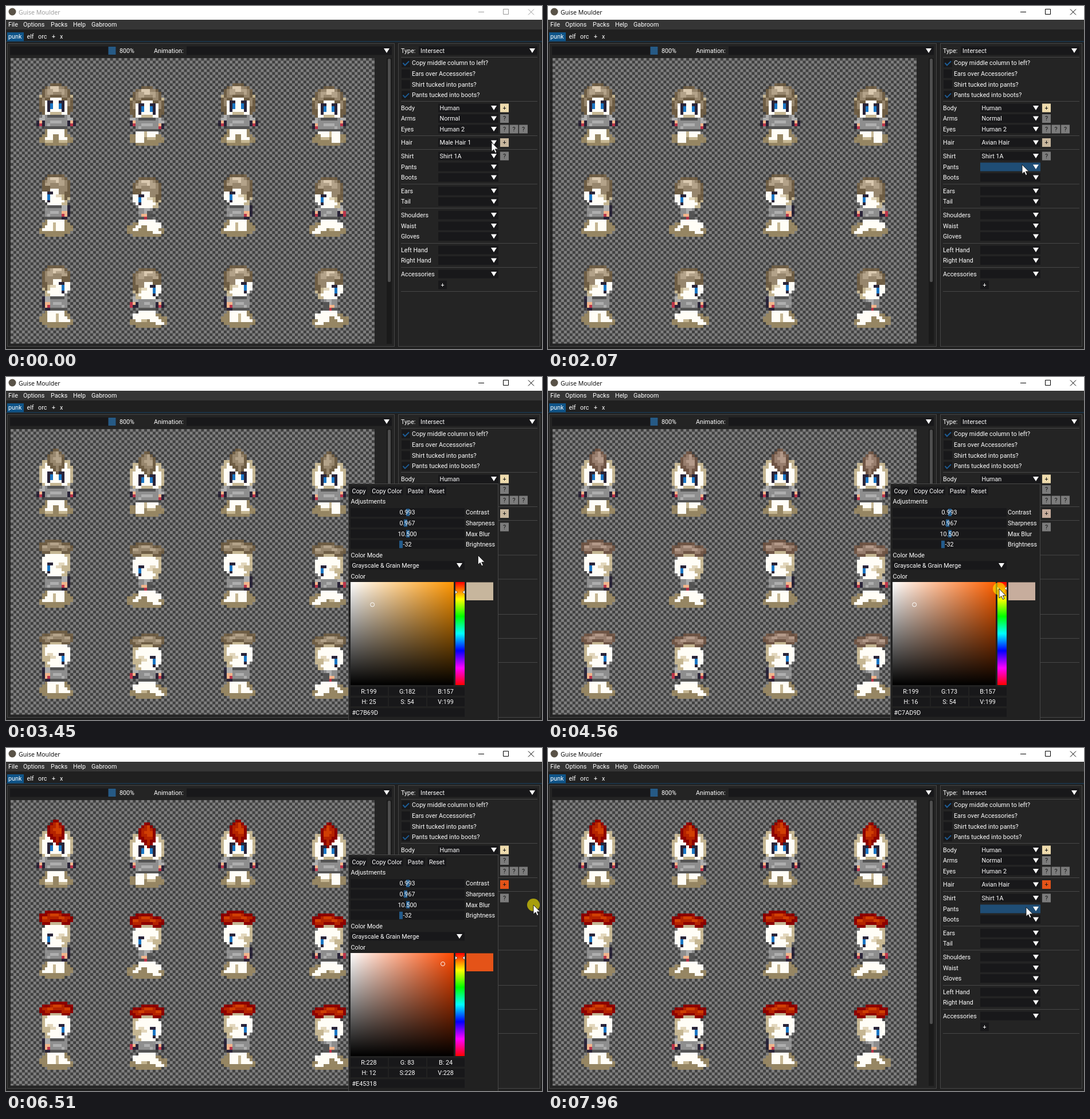
Recreate the animation shown at these times as an HTML page. Size 935x599 px, loop 8 s.

```html
<!DOCTYPE html>
<html lang="en">
<head>
<meta charset="utf-8">
<title>Guise Moulder</title>
<style>
html,body{margin:0;width:100%;height:100%;overflow:hidden;background:#202020}
svg{display:block;width:100vw;height:100vh}
text{font:10.75px Roboto,sans-serif;fill:#fff;white-space:pre}
.title{font:10.6px "Open Sans",sans-serif}
.mid{text-anchor:middle}
.px{shape-rendering:crispEdges}
.h0{fill:var(--h0)}.h1{fill:var(--h1)}.h2{fill:var(--h2)}.h3{fill:var(--h3)}
</style>
</head>
<body>
<svg id="stage" viewBox="0 0 935 599" xmlns="http://www.w3.org/2000/svg"></svg>
<script>
const LOOP = 8000, PX = 4.96;
const FRAME = '#18181a', BLUE = '#1f4d75', LINE = '#474747', THUMB = '#4f4f4f';
const TAN = '#968663', SAND = '#c5b692', WHITE = '#fffdf6', NAVY = '#2a2438',
  SKIN = '#f3b58c', RED = '#b9344a', G0 = '#545454', G1 = '#8e8e8e', G2 = '#aeaeae', EYE = '#1b76c4';

const rect = (x, y, w, h, fill, more = '') => `<rect x="${x}" y="${y}" width="${w}" height="${h}" fill="${fill}" ${more}/>`;
const text = (x, y, s, more = '') => `<text x="${x}" y="${y + 3.8}" ${more}>${s}</text>`;
const path = (d, fill) => `<path d="${d}" fill="${fill}"/>`;
const tone = (n, d) => `<path class="h${n}" d="${d}"/>`;
const group = (id, s, more = '') => `<g id="${id}" ${more}>${s}</g>`;
const arrow = (x, y) => path(`M${x - 5} ${y - 4}h10l-5 8z`, '#fff');
const flip = s => `<g transform="translate(32 0) scale(-1 1)">${s}</g>`;
const both = s => s + flip(s);

// ---- characters, drawn on a 32 unit cell ----
const heads = group('front',
  path('M13 10h6v1h2v2h1v6h-1v1h-10v-1h-1v-6h1v-2h2z', SAND) +
  path('M13 11h6v1h1v2h1v5h-1v1h-8v-1h-1v-5h1v-2h1z', WHITE) +
  `<g class="old">` +
  tone(0, 'M14 9h4v1h2v1h1v3h1v5h-1v1h-1v-5h-2v-1h-4v1h-2v5h-1v-1h-1v-5h1v-3h1v-1h2z') +
  tone(1, 'M13 10h6v1h1v3h1v3h-1v-3h-2v-1h-4v1h-2v3h-1v-3h1v-3h1z') +
  tone(2, 'M13 11h6v2h-1v-1h-3v1h-2z') + tone(3, 'M14 10h3v2h-2v-1h-1z') + `</g><g class="new">` +
  tone(0, 'M15 7h2v1h1v1h1v5h-1v1h-1v1h-1v-1h-1v-1h-1v-1h-1v-4h1v-1h1z') +
  tone(1, 'M15 8h2v1h1v4h-1v2h-1v-2h-1v-1h-1v-3h1z') +
  tone(2, 'M16 8h1v2h1v2h-2v-1h-1v-1h1z') + `</g>` +
  both(path('M13 15h2v1h-1v2h-1zM13 18h1v1h-1z', NAVY) + path('M14 16h1v2h-1z', EYE)) +
  path('M14 19h4v1h-4z', SAND)) +
group('side',
  path('M12 11h8v1h1v6h-1v2h-7v-1h-1v-1h-1v-5h1z', SAND) +
  path('M12 12h7v1h1v3h-2v2h1v1h-1v1h-5v-1h-1v-1h-1v-5h1z', WHITE) +
  path('M17 15h2v1h-1v1h-2v-1h1z', '#e2d6bb') + `<g class="old">` +
  tone(0, 'M13 9h6v1h1v1h1v6h-1v1h-1v-2h-2v-2h-3v1h-3v-4h1v-1h1z') +
  tone(1, 'M13 10h6v1h1v4h-1v1h-2v-2h-3v-1h-2v-2h1z') +
  tone(2, 'M13 10h5v1h1v2h-2v-1h-3v1h-2v-1h1z') + tone(3, 'M14 10h3v2h-1v-1h-2z') + `</g><g class="new">` +
  tone(0, 'M13 7h5v1h3v1h1v2h-1v1h-3v-1h-4v1h-3v-1h-1v-3h2v-1h1z') +
  tone(1, 'M13 8h5v1h3v1h-1v1h-2v-1h-4v1h-3v-2h2z') +
  tone(2, 'M14 8h3v1h2v1h-2v-1h-3zM11 9h2v1h-2z') + `</g>` +
  path('M13 15h2v1h-1v3h-1z', NAVY) + path('M13 16h1v2h-1z', EYE));

const shirt = (x, y, w) => rect(x, y, w, 5, G1) + rect(x + 1, y, w - 2, 1, G0) +
  rect(x + 2, y + 2, w - 4, 1, G2) + rect(x + 1, y + 3, 1, 1, G2) + rect(x, y + 4, w, 1, G0);
const hand = (x, y) => rect(x - 1, y, 3, 2, NAVY) + rect(x, y, 1, 1, SKIN) + rect(x, y + 1, 1, 1, RED);
const sleeve = (x, y) => path(`M${x} ${y}h2v3h-3v-2h1z`, G2);
const useHead = (id, dy) => `<use href="#${id}" y="${dy}"/>`;

const poses = group('idle',
  path('M12 25h8v2h1v1h1v2h-2v1h-8v-1h-2v-2h1v-1h1z', TAN) +
  both(path('M13 25h3v2h-1v2h-3v-1h1z', WHITE) + path('M12 29h3v1h-3z', SAND) +
    sleeve(11, 20) + hand(10, 22)) + shirt(12, 20, 8) + useHead('front', 0)) +
group('step',
  path('M12 25h8v2h1v1h1v2h-2v1h-8v-1h-2v-3h2z', TAN) +
  path('M12 26h3v4h-3zM16 25h4v2h-1v1h-3z', WHITE) + path('M15 26h1v2h-1zM16 28h3v1h-3z', SAND) +
  sleeve(11, 20) + hand(11, 22) + flip(sleeve(11, 21)) + hand(20, 23) +
  shirt(12, 21, 8) + useHead('front', 1)) +
group('sideIdle',
  path('M12 25h8v1h1v1h1v2h-1v1h-2v1h-7v-1h-2v-2h1v-2h1z', TAN) +
  path('M13 24h6v5h-3v-2h-1v2h-4v-1h1v-1h1z', WHITE) + path('M15 26h1v3h-1z', SAND) +
  shirt(12, 20, 7) + path('M18 19h2v4h-2z', G2) + path('M20 20h1v4h-1zM18 24h2v1h-2z', NAVY) +
  path('M18 22h2v1h-2zM19 23h1v1h-1z', SKIN) + path('M18 23h1v1h-1z', RED) + useHead('side', 0)) +
group('stride',
  path('M12 26h8v1h1v1h1v2h-1v1h-10v-1h-2v-3h2v-1z', TAN) +
  path('M13 25h6v1h2v2h-1v1h-1v-1h-3v-1h-2v1h-1v1h-2v-1h1v-1h1z', WHITE) +
  path('M16 28h3v1h2v1h-3v-1h-2z', WHITE) +
  shirt(13, 20, 5) + path('M15 20h2v3h-2z', G2) + path('M16 22h2v2h-1v1h-1z', G0) +
  path('M14 23h2v1h-2z', SKIN) + path('M15 24h1v1h-1z', RED) + useHead('side', 1)) +
group('swing',
  path('M12 26h8v1h1v1h1v2h-2v1h-9v-1h-2v-3h2v-1z', TAN) +
  path('M13 25h6v1h2v2h-1v1h-2v-1h-3v1h-2v1h-3v-1h1v-1h1v-1h1z', WHITE) +
  path('M16 28h2v1h-2z', SAND) +
  path('M11 21h3v2h-3zM18 20h3v2h-3z', G2) + shirt(13, 20, 6) +
  path('M10 22h3v2h-3zM19 22h3v2h-3z', NAVY) + path('M11 22h1v1h-1zM20 22h1v1h-1z', SKIN) +
  path('M11 23h1v1h-1zM21 22h1v2h-1z', RED) + useHead('side', 1));

const use = id => `<use href="#${id}"/>`;
const sheet = [
  [use('idle'), use('step'), use('idle'), flip(use('step'))],
  [use('sideIdle'), use('stride'), use('sideIdle'), use('swing')],
  [use('sideIdle'), use('swing'), use('sideIdle'), use('stride')].map(flip)
].map((row, j) => row.map((s, i) => `<g transform="translate(${i * 32} ${j * 32})">${s}</g>`).join('')).join('');

// ---- window ----
const combos = [['Body', 178, 'Human'], ['Arms', 196.5, 'Normal'], ['Eyes', 215, 'Human 2'], ['Hair', 238.5, ''],
  ['Shirt', 262, 'Shirt 1A'], ['Pants', 281, ''], ['Boots', 299.5, ''], ['Ears', 323, ''], ['Tail', 341.5, ''],
  ['Shoulders', 365, ''], ['Waist', 384, ''], ['Gloves', 402.5, ''], ['Left Hand', 426, ''],
  ['Right Hand', 444.5, ''], ['Accessories', 468, '']];
const checks = [['Copy middle column to left?', 1], ['Ears over Accessories?', 0],
  ['Shirt tucked into pants?', 0], ['Pants tucked into boots?', 1]];
const box = (x, y, w, more) => rect(x, y - 7.5, w, 15, FRAME, more);
const tile = (x, y, s, fill, more) => rect(x, y - 7.5, 15, 15, fill, more) +
  text(x + 7.5, y, s, 'class="mid" style="fill:#151515"');
const panel = (x, y, w, h) => rect(x, y, w, h, '#242424', `stroke="${LINE}"`);

const chrome = rect(0, 0, 935, 24, '#fff') + `<circle cx="11" cy="10" r="6.5" fill="#595247"/>` +
  group('caption', `<text class="title" x="22" y="15" style="fill:currentColor">Guise Moulder</text>
    <path d="M824 10.5h10M867.5 5.5h9v9h-9zM911 5.5l10 10M921 5.5l-10 10" fill="none" stroke="currentColor"/>`) +
  rect(0, 24, 935, 17, '#353535') +
  [[4, 'File'], [30, 'Options'], [78, 'Packs'], [117, 'Help'], [149, 'Gabroom']].map(m => text(m[0], 32.5, m[1])).join('') +
  rect(2, 46, 29, 15.5, '#0f5488') + rect(0, 61.5, 935, 1, '#16456b') +
  [[4, 'punk'], [36.5, 'elf'], [56, 'orc'], [80, '+'], [94, 'x']].map(m => text(m[0], 53.5, m[1])).join('');

const left = panel(2.5, 65.5, 675, 529) + box(7, 78, 185) + rect(178.5, 71, 13, 14, '#265a85') + text(198, 78, '800%') +
  text(258, 78, 'Animation:') + box(315, 78, 358) + arrow(664, 78) +
  rect(664, 91, 9, 499, '#1a1a1a') + rect(666, 92, 5, 390, THUMB, 'rx="2"') +
  `<g clip-path="url(#view)"><g class="px" transform="translate(8 90.5) scale(${PX})">
    <rect width="128" height="101" fill="url(#checker)"/>${sheet}</g></g>`;

const right = panel(684.5, 65.5, 247, 529) + text(689, 78, 'Type:') + box(720, 78, 207) + text(723, 78, 'Intersect') + arrow(918, 78) +
  checks.map(([s, on], i) => {
    const y = 99.5 + i * 18.7;
    return box(690, y, 15) + text(708, y, s) +
      (on ? `<path d="M692.5 ${y}l3.5 4 7-7" fill="none" stroke="#1d5c94" stroke-width="2"/>` : '');
  }).join('') +
  [89.5, 166.5, 226.5, 250.5, 311, 353, 414.5, 456.5, 498.5].map(y => rect(689, y - .5, 238, 1, LINE)).join('') +
  combos.map(([s, y, v], i) => text(689, y, s) + box(754, y, 105, `id="combo${i}"`) +
    (s === 'Hair' ? rect(843, y - 7.5, 16, 15, '#1d588c', 'id="open"') : '') +
    text(756.5, y, v, `id="value${i}"`) + arrow(851, y)).join('') +
  tile(862, 178, '+', '#efdcae') + tile(862, 238.5, '+', '#000', 'id="tint"') +
  [[862, 196.5], [862, 215], [878.5, 215], [895, 215], [862, 262]].map(p => tile(...p, '?', '#7c7c7c')).join('') +
  box(754, 487, 15) + text(761.5, 487, '+', 'class="mid"');

// ---- hair list ----
const ROW = 14.9, TOP = 248;
const series = (s, n) => Array.from({ length: n }, (_, i) => `${s} Hair ${i + 1}`);
const hairs = ['', 'Avian Hair', ...series('Female', 7), ...series('Male', 8)];
const list = group('list', rect(754.5, 247.5, 104, 125.5, '#171717', `stroke="${LINE}"`) +
  `<g clip-path="url(#listView)">` + group('items', rect(755, 9 * ROW, 94, ROW, '#242428') +
    rect(755, 0, 94, ROW, BLUE, 'id="hot"') + hairs.map((s, i) => text(756.5, (i + .5) * ROW, s)).join('')) + `</g>` +
  rect(852, 0, 5.5, 60, THUMB, 'id="thumb" rx="2"'));

// ---- colour popup ----
const sliders = [['Contrast', '0.993', 698], ['Sharpness', '0.967', 694], ['Max Blur', '10.500', 698], ['Brightness', '-32', 686]];
const fields = [0, 1, 2, 3, 4, 5].map(i => {
  const x = 601 + i % 3 * 67, y = i < 3 ? 549 : 567.5;
  return box(x, y, 65) + text(x + 32, y, '', `class="mid" id="num${i}"`);
}).join('');
const popup = group('popup', rect(597.5, 186.5, 261, 415, '#212121', `stroke="${LINE}"`) +
  [[601, 29, 'Copy'], [636, 57, 'Copy Color'], [698, 33, 'Paste'], [735, 33, 'Reset']]
    .map(([x, w, s]) => box(x, 199, w) + text(x + w / 2, 199, s, 'class="mid"')).join('') +
  text(601.5, 217.5, 'Adjustments') +
  sliders.map(([s, v, x], i) => {
    const y = 236.5 + i * 18.6;
    return box(601, y, 199) + rect(x, y - 6.5, 6, 13, '#235b8b') + text(700, y, v, 'class="mid"') + text(802, y, s);
  }).join('') +
  text(601.5, 311, 'Color Mode') + box(601, 329, 199) + text(603.5, 329, 'Grayscale &amp; Grain Merge') + arrow(791, 329) +
  text(601.5, 348, 'Color') + rect(601, 358, 180, 180, '#f00', 'id="pure"') +
  rect(601, 358, 180, 180, 'url(#toWhite)') + rect(601, 358, 180, 180, 'url(#toBlack)') +
  `<circle id="pick" r="3.5" fill="none" stroke="#fff"/>` + rect(784, 358, 16, 180, 'url(#hues)') +
  group('huePos', path('M783.5-3.5l4 3.5-4 3.5zM800.5-3.5l-4 3.5 4 3.5z', '#fff'), 'stroke="#111" stroke-width=".6"') +
  rect(803, 358.5, 47, 31.5, '#000', 'id="swatch"') + fields + box(601, 586, 199) + text(603.5, 586, '', 'id="hex"'));

const stops = (list) => list.map((c, i) => `<stop offset="${i / (list.length - 1)}" stop-color="${c}"/>`).join('');
const stage = document.getElementById('stage');
stage.innerHTML = `<defs>
  <clipPath id="view"><rect x="8" y="90.5" width="635" height="499"/></clipPath>
  <clipPath id="listView"><rect x="755" y="248" width="103" height="124.5"/></clipPath>
  <pattern id="checker" width="2" height="2" patternUnits="userSpaceOnUse">
    <rect width="2" height="2" fill="#7f7f7f"/><path d="M1 0h1v1h-1zM0 1h1v1h-1z" fill="#404040"/></pattern>
  <linearGradient id="toWhite"><stop stop-color="#fff"/><stop offset="1" stop-color="#fff" stop-opacity="0"/></linearGradient>
  <linearGradient id="toBlack" x2="0" y2="1"><stop stop-opacity="0"/><stop offset="1"/></linearGradient>
  <linearGradient id="hues" x2="0" y2="1">${stops(['#f00', '#ff0', '#0f0', '#0ff', '#00f', '#f0f', '#f00'])}</linearGradient>
  ${heads}${poses}</defs>` +
  rect(0, 0, 935, 599, '#202020') + chrome + left + right + list + popup +
  `<circle id="press" r="11" fill="#fff000" fill-opacity=".6"/>
  <path id="cursor" d="M0 0v16.3l3.8-3.5 2.6 5.7 2.6-1.1-2.6-5.5h5.2z" fill="#fff" stroke="#111" stroke-width=".9"/>`;

// ---- motion ----
const $ = id => document.getElementById(id);
const set = (id, o) => { for (const k in o) $(id).setAttribute(k, o[k]); };
const show = (el, on) => el.style.display = on ? '' : 'none';
const route = [[970, 847, 238], [1070, 829, 275], [1450, 829, 275], [1490, 827, 277], [2230, 827, 277], [2550, 869, 238],
  [3150, 869, 238], [3710, 787, 370], [3740, 786.5, 367.5], [3940, 786.5, 367.5], [4000, 787, 369.8], [4560, 787, 369.8],
  [4810, 787, 367.1], [4960, 787, 367.1], [5110, 745, 383], [5350, 762, 377], [5960, 762, 377], [6260, 920, 274],
  [6680, 920, 274], [7300, 849, 268], [7430, 849, 268], [7600, 841, 268], [7800, 841, 268], [7960, 834, 278]];
const presses = [[170, 290], [1950, 2040], [2910, 2990], [3940, 4810], [5110, 5960], [6510, 6600]];

function cursorAt(t) {
  const i = route.findIndex(k => k[0] > t);
  if (i < 0) return route[route.length - 1].slice(1);
  if (!i) return route[0].slice(1);
  const [a, ax, ay] = route[i - 1], [b, bx, by] = route[i];
  const u = (t - a) / (b - a), e = u * u * (3 - 2 * u);
  return [ax + (bx - ax) * e, ay + (by - ay) * e];
}

function hsv(h, s, v) {
  const f = n => {
    const k = (n + h / 42.5) % 6;
    return Math.round(v * (1 - s / 255 * Math.max(0, Math.min(k, 4 - k, 1))));
  };
  return [f(5), f(3), f(1)];
}

function colorAt(t) {
  const clampT = (a, b) => Math.max(a, Math.min(b, t));
  const h = t < 3940 ? 25 : (cursorAt(clampT(3940, 4810))[1] - 358.5) / 180 * 255;
  if (t < 5110) return [h, 54, 199];
  const [x, y] = cursorAt(clampT(5110, 5900));
  return [h, (x - 601) / 180 * 255, (538 - y) / 180 * 255];
}

function draw(t) {
  const [x, y] = cursorAt(t), [h, s, v] = colorAt(t), rgb = hsv(h, s, v);
  const css = c => `rgb(${c})`, color = css(rgb);
  const listOpen = t >= 200 && t < 2040, popupOpen = t >= 2990 && t < 6580, avian = t >= 2150;

  $('caption').style.color = t < 170 ? '#999' : '#000';
  [40, 80, 108, 146].forEach((g, i) =>
    stage.style.setProperty('--h' + i, css(rgb.map(c => Math.max(0, Math.min(255, c + g - 128))))));
  document.querySelectorAll('.old').forEach(el => show(el, !avian));
  document.querySelectorAll('.new').forEach(el => show(el, avian));

  combos.forEach(([, cy], i) => {
    const hot = t >= 170 && !listOpen && !popupOpen && x >= 754 && x < 859 && Math.abs(y - cy) < 7.5;
    set('combo' + i, { fill: hot ? BLUE : FRAME });
  });
  $('value3').textContent = t < 2040 ? 'Male Hair 1' : 'Avian Hair';
  show($('open'), listOpen);
  set('tint', { fill: color });

  show($('list'), listOpen);
  const scroll = t < 1170 ? 81 : t < 1290 ? 11 : 0;
  set('items', { transform: `translate(0 ${TOP - scroll})` });
  set('thumb', { y: TOP + scroll * .48 });
  show($('hot'), y > TOP);
  set('hot', { y: Math.floor((y - TOP + scroll) / ROW) * ROW });

  show($('popup'), popupOpen);
  set('pure', { fill: css(hsv(h, 255, 255)) });
  set('pick', { cx: 601 + s / 255 * 180, cy: 538 - v / 255 * 180 });
  set('huePos', { transform: `translate(0 ${358 + h / 255 * 180})` });
  set('swatch', { fill: color });
  [...rgb, h, s, v].forEach((n, i) =>
    $('num' + i).textContent = 'RGBHSV'[i] + ':' + String(Math.round(n)).padStart(3));
  $('hex').textContent = '#' + rgb.map(n => n.toString(16).padStart(2, '0')).join('').toUpperCase();

  set('cursor', { transform: `translate(${x} ${y})` });
  set('press', { cx: x, cy: y });
  show($('press'), presses.some(([a, b]) => t >= a && t < b));
}

const start = performance.now();
function tick() {
  draw((performance.now() - start) % LOOP);
  requestAnimationFrame(tick);
}
tick();
</script>
</body>
</html>
```
